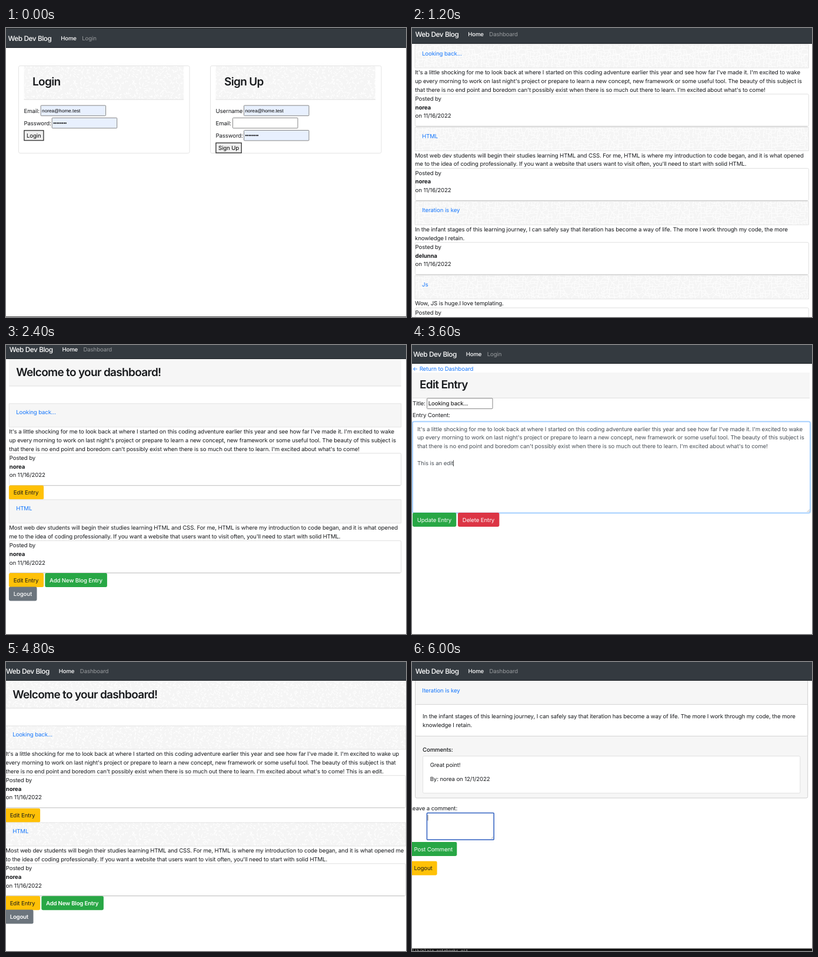
An HTML page for the animation above (7.2 s loop, 680 px wide and 493 px high).

```html
<!DOCTYPE html>
<html lang="en">
<head>
<meta charset="utf-8">
<title>Blog walkthrough</title>
<style>
  html, body { margin: 0; width: 100%; height: 100%; overflow: hidden; background: #fff; }
  svg { display: block; }
  text {
    font: 9.65px Inter, "Open Sans", sans-serif;
    font-optical-sizing: none;
    letter-spacing: -.012em;
    text-rendering: geometricPrecision;
    fill: #17191c;
  }
  .brand { font-size: 11.8px; font-weight: 500; letter-spacing: -.035em; fill: #fff; }
  .heading { font-size: 19px; font-weight: 600; letter-spacing: -.036em; }
  .active { font-weight: 500; fill: #fff; }
  .muted { fill: #999c9f; }
  .link { fill: #1577fd; }
  .white { fill: #fff; }
  .black { fill: #000; }
  .typed { fill: #495057; }
  .medium { font-weight: 500; }
  .semibold { font-weight: 600; letter-spacing: -.02em; }
  .bold { font-weight: 700; }
  .field { font: 8.2px "Liberation Sans", Arial, sans-serif; letter-spacing: 0; fill: #000; }
  .mono { font: 6.9px "DejaVu Sans Mono", monospace; letter-spacing: 0; fill: #bbb; }
</style>
</head>
<body>
<svg id="stage" width="680" height="493" viewBox="0 0 680 493"></svg>
<script>
const FLAT = '#f6f6f6', BORDER = '#dfdfdf';
const GREEN = '#28a745', RED = '#dc3545', YELLOW = '#ffc107', GRAY = '#6c757d';
const LINE = 14.72;
const AUTHOR = 'norea';

const LOOKING = "It's a little shocking for me to look back at where I started on this coding adventure earlier this year and see how far I've made it. I'm excited to wake up every morning to work on last night's project or prepare to learn a new concept, new framework or some useful tool. The beauty of this subject is that there is no end point and boredom can't possibly exist when there is so much out there to learn. I'm excited about what's to come!";
const HTML = "Most web dev students will begin their studies learning HTML and CSS. For me, HTML is where my introduction to code began, and it is what opened me to the idea of coding professionally. If you want a website that users want to visit often, you'll need to start with solid HTML.";
const ITERATION = 'In the infant stages of this learning journey, I can safely say that iteration has become a way of life. The more I work through my code, the more knowledge I retain.';

// Splits a paragraph into lines, each later line starting with the given phrase.
const wrap = (text, ...starts) =>
  starts.reduce((s, phrase) => s.replace(' ' + phrase, '\n' + phrase), text).split('\n');

const lookingLines = wrap(LOOKING, 'up every', 'that there is no');
const htmlLines = wrap(HTML, 'me to the idea');
const iterationLines = wrap(ITERATION, 'knowledge');

const text = (x, y, s, cls = '') => `<text x="${x}" y="${y}" class="${cls}">${s}</text>`;
const paragraph = (x, y, lines, cls) => lines.map((s, i) => text(x, y + i * LINE, s, cls)).join('');
const rect = (x, y, w, h, fill, stroke = 'none', r = 0, sw = 1) =>
  `<rect x="${x}" y="${y}" width="${w}" height="${h}" rx="${r}" fill="${fill}" stroke="${stroke}" stroke-width="${sw}"/>`;
const path = (d, stroke, width = 1) => `<path d="${d}" fill="none" stroke="${stroke}" stroke-width="${width}"/>`;

function randomizer(seed) {
  return () => (seed = (seed * 16807) % 2147483647) / 2147483647;
}

function pattern(id, size, d, width) {
  return `<pattern id="${id}" width="${size}" height="${size}" patternUnits="userSpaceOnUse">` +
    rect(0, 0, size, size, '#f5f5f5') + path(d, '#fff', width) + '</pattern>';
}

// Short curled strokes on a jittered grid.
function squiggles() {
  const random = randomizer(71), cell = 5, count = 20;
  let d = '';
  for (let i = 0; i < count * count; i++) {
    const x = (i % count + random()) * cell, y = (Math.floor(i / count) + random()) * cell;
    const a = random() * 6.283, bend = a + random() * 2 - 1;
    d += `M${x.toFixed(1)} ${y.toFixed(1)}q${(2 * Math.cos(a)).toFixed(1)} ${(2 * Math.sin(a)).toFixed(1)} ` +
      `${(4 * Math.cos(bend)).toFixed(1)} ${(4 * Math.sin(bend)).toFixed(1)}`;
  }
  return pattern('squiggles', cell * count, d, 1.1);
}

// A wrapping net of jittered cells.
function crackle() {
  const random = randomizer(19), cell = 5, count = 24;
  const jitter = Array.from({ length: count * count }, () => [random() * 5, random() * 5]);
  const point = (i, j) => {
    const [dx, dy] = jitter[(j % count) * count + i % count];
    return `${(i * cell + dx).toFixed(1)} ${(j * cell + dy).toFixed(1)}`;
  };
  let d = '';
  for (let j = 0; j < count; j++) for (let i = 0; i < count; i++) {
    if (random() < .8) d += `M${point(i, j)}L${point(i + 1, j)}`;
    if (random() < .8) d += `M${point(i, j)}L${point(i, j + 1)}`;
  }
  return pattern('crackle', cell * count, d, 1);
}

function nav(height, x, y, link) {
  return rect(0, 0, 680, height, '#343a40') + rect(0, height - 1, 680, 1, '#1d2125') +
    text(x, y, 'Web Dev Blog', 'brand') +
    text(x + 89.7, y - .8, 'Home', 'active') + text(x + 125.8, y - .8, link, 'muted');
}

function header(x, y, w, h, fill, title, pad = 12, lift = 17) {
  return rect(x, y, w, h, fill) + rect(x, y + h - .5, w, 1, BORDER) +
    text(x + pad, y + h - lift, title, 'heading');
}

function input(x, y, value = '', fill = '#e8f0fe') {
  return rect(x + .5, y + .5, 110.5, 17.6, fill, '#858585', 1) + text(x + 2.5, y + 12.3, value, 'field');
}

function plainButton(x, y, w, label) {
  return rect(x + .6, y + .6, w - 1.2, 17, '#efefef', '#1c1c1c', 0, 1.2) + text(x + 4.7, y + 12.8, label, 'black');
}

function button(x, y, w, label, fill, cls = 'white') {
  return rect(x - .3, y - .4, w + .6, 24, fill, 'none', 2.4) + text(x + 7.5, y + 15.1, label, cls);
}

function card(x, y, w, title, lines, author, fill) {
  const top = y + 41 + LINE * lines.length;
  return rect(x, y, w, 40.5, fill) + path(`M${x} ${y + 40.5}V${y + .5}H${x + w}V${y + 40.5}Z`, BORDER, .8) +
    text(x + 12, y + 18.9, title, 'link') + paragraph(x, y + 51.6, lines) +
    rect(x + .3, top, w - .3, 55, '#fff', BORDER, 2) +
    path(`M${x + 2} ${top + 55}h${w - 4}`, '#c6c6c6') +
    text(x + .6, top + 11.2, 'Posted by') + text(x + .6, top + 25.9, author, 'bold') +
    text(x + .6, top + 40.7, 'on 11/16/2022');
}

function signForm(x, title, fields, label, buttonWidth) {
  const rows = fields.map(([name, offset, value, fill], i) =>
    text(x + 9.5, 144.6 + i * 21.2, name) + input(x + offset, 131.6 + i * 21.2, value, fill)).join('');
  return rect(x + .5, 64.5, 290.5, 149, '#fff', '#e4e4e4', 2.4) +
    header(x + 9.5, 65, 271.5, 57, 'url(#squiggles)', title, 14.5, 24.3) +
    rows + plainButton(x + 9.3, 131.8 + fields.length * 21.2, buttonWidth, label);
}

function signInPage() {
  const email = 'norea@home.test', dots = '•'.repeat(8);
  return nav(34, 3.5, 22, 'Login') + rect(0, 0, 680, 1, '#1d2023') +
    signForm(21, 'Login', [['Email:', 37.6, email], ['Password:', 56.7, dots]], 'Login', 34.2) +
    signForm(347, 'Sign Up', [['Username', 57, email], ['Email:', 38, '', '#fff'], ['Password:', 57, dots]], 'Sign Up', 44.5) +
    rect(0, 492, 680, 1, '#4a4a4a');
}

function homePage() {
  const posts = [
    [27.6, 'Looking back...', lookingLines, AUTHOR],
    [169, 'HTML', htmlLines, AUTHOR],
    [295.3, 'Iteration is key', iterationLines, 'delunna'],
    [421.7, 'Js', ['Wow, JS is huge.I love templating.'], AUTHOR]
  ];
  return posts.map(([y, ...post]) => card(5, y, 669.3, ...post, 'url(#crackle)')).join('') +
    nav(27, 5.5, 14.6, 'Dashboard');
}

function dashboard({ x, w, headerTop, headerHeight, first, second, looking, html, fill, labelClass }) {
  const row = second + 41 + LINE * 2 + 55.6;
  return header(x, headerTop, w, headerHeight, fill, 'Welcome to your dashboard!') +
    card(x, first, w, 'Looking back...', looking, AUTHOR, fill) +
    button(x, second - 23.4, 58.6, 'Edit Entry', YELLOW, '') +
    card(x, second, w, 'HTML', html, AUTHOR, fill) +
    button(x, row, 58.6, 'Edit Entry', YELLOW, '') +
    button(x + 61.4, row, 105, 'Add New Blog Entry', GREEN, labelClass) +
    button(x, row + 23.4, 47, 'Logout', GRAY, labelClass);
}

function dashboardBefore() {
  return dashboard({
    x: 5.2, w: 666.5, headerTop: 24, headerHeight: 46, first: 99.5, second: 263.4,
    looking: lookingLines, html: htmlLines, fill: FLAT, labelClass: 'white medium'
  }) + nav(24, 5.7, 11.6, 'Dashboard');
}

function dashboardAfter() {
  return dashboard({
    x: -.8, w: 680.3, headerTop: 32, headerHeight: 46.8, first: 108.5, second: 273.5,
    looking: wrap(LOOKING + ' This is an edit.', 'every morning', 'there is no end'),
    html: wrap(HTML, 'to the idea'), fill: 'url(#squiggles)', labelClass: 'white semibold'
  }) + nav(32, 0, 20, 'Dashboard');
}

function editPage() {
  return nav(32, 2, 20, 'Login') +
    text(1, 43.5, '← Return to Dashboard', 'link') +
    header(1, 47, 675, 43.5, FLAT, 'Edit Entry') +
    text(1, 103.2, 'Title:') + rect(25.5, 90.9, 111.5, 17.8, '#fff', '#858585', 1) +
    text(27.8, 103.2, 'Looking back...', 'black') +
    text(1, 122.6, 'Entry Content:') +
    rect(1.2, 131, 675.6, 155.2, '#fff', '#bfdeff', 2.5, 3.2) +
    rect(1.2, 131, 675.6, 155.2, '#fff', '#80bdff', 2.5, .9) +
    paragraph(9, 146.6, [...lookingLines, '', 'This is an edit'], 'typed') +
    rect(70, 196.5, .8, 10.5, '#222') +
    path('M671.5 285L676 280.5M674 285L676 283', '#888', .6) +
    button(1.3, 286.4, 73.7, 'Update Entry', GREEN) +
    button(78.3, 286.4, 69.8, 'Delete Entry', RED);
}

function postPage() {
  return rect(5.5, 20, 667.2, 212, FLAT, '#cfcfcf', 2.4) +
    text(17.3, 51.5, 'Iteration is key', 'link') +
    rect(5.5, 72.4, 667.2, 54, '#fff', '#d4d4d4', 2) +
    paragraph(18, 96, iterationLines) +
    text(18, 153, 'Comments:', 'medium') +
    rect(18.5, 160.5, 641.3, 63.3, '#fff', '#e2e2e2', 2) +
    text(30.7, 179, 'Great point!') + text(30.7, 203, `By: ${AUTHOR} on 12/1/2022`) +
    text(-4.5, 253.2, 'Leave a comment:') +
    rect(25.4, 257.5, 113.8, 45.7, '#fff', '#2f5fc0', 1, 1.5) +
    rect(26.6, 261, .8, 9.5, '#555') +
    path('M134.5 301.5L138 298M136.5 301.5L138 300', '#888', .6) +
    button(-4, 307.4, 80, 'Post Comment', GREEN) +
    button(-4, 340.1, 46.3, 'Logout', YELLOW, '') +
    nav(32, 5.7, 20.2, 'Dashboard') +
    rect(0, 488.7, 680, 5, '#141414') +
    text(0, 495, 'lib/plain-notebooks.git', 'mono');
}

const pages = [signInPage, homePage, dashboardBefore, editPage, dashboardAfter, postPage];
const stage = document.getElementById('stage');
stage.innerHTML = `<defs>${squiggles()}${crackle()}</defs>` +
  pages.map(page => `<g class="page" display="none">${page()}</g>`).join('');
const groups = stage.querySelectorAll('.page');

const PAGE_MS = 1200;
const start = performance.now();
let shown = -1;

function draw() {
  const index = Math.floor(Math.max(0, performance.now() - start) / PAGE_MS) % pages.length;
  if (index !== shown) {
    groups.forEach((group, i) => group.setAttribute('display', i === index ? 'inline' : 'none'));
    shown = index;
  }
  requestAnimationFrame(draw);
}
draw();
</script>
</body>
</html>
```
